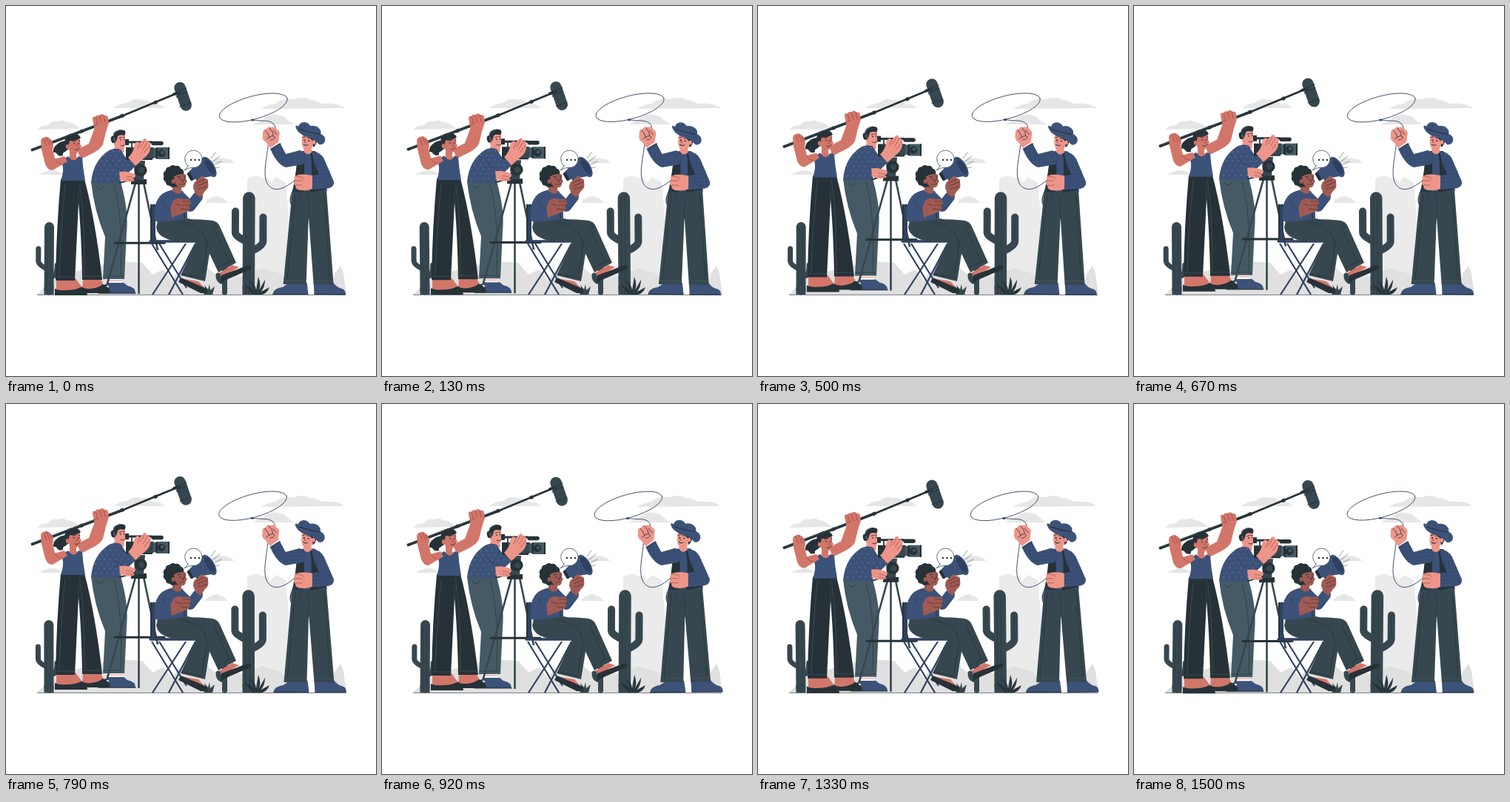
An HTML page with a canvas for the animation above (1.54 s loop, 500 px wide and 500 px high).

```html
<!DOCTYPE html>
<html lang="en">
<head>
<meta charset="utf-8">
<title>Desert film set</title>
<style>
html, body { margin: 0; width: 100%; height: 100%; overflow: hidden; background: #fff; }
canvas { display: block; width: 100vw; height: 100vh; }
</style>
</head>
<body>
<canvas id="stage"></canvas>
<script>
const canvas = document.getElementById('stage');
const ctx = canvas.getContext('2d');
const ratio = Math.max(1, window.devicePixelRatio || 1);
canvas.width = canvas.height = 500 * ratio;

const LOOP = 1540, TAU = Math.PI * 2;
const INK = '#263238', SLATE = '#37474f', STEEL = '#455a64', BLUE = '#3c5279', NAVY = '#2f4160';
const TAN = '#d3766a', TAN_LINE = '#9c4a44', PINK = '#ee958a', PINK_LINE = '#a8524c';
const BROWN = '#9f5b53', BROWN_LINE = '#5f302c', CLOUD = '#e6e6e6', HILL = '#ebebeb', DUNE = '#e0e0e0';

const cache = {};
const shape = d => cache[d] || (cache[d] = new Path2D(d));

function fill(color, d) {
  ctx.fillStyle = color;
  ctx.fill(shape(d));
}
function line(color, width, d, cap = 'round') {
  ctx.strokeStyle = color;
  ctx.lineWidth = width;
  ctx.lineCap = cap;
  ctx.lineJoin = 'round';
  ctx.stroke(shape(d));
}
function oval(color, x, y, rx, ry = rx, turn = 0) {
  ctx.fillStyle = color;
  ctx.beginPath();
  ctx.ellipse(x, y, rx, ry, turn, 0, TAU);
  ctx.fill();
}
function group(draw, change) {
  ctx.save();
  if (change) change();
  draw();
  ctx.restore();
}
// Small marks kept inside a garment.
function pattern(d, draw) {
  group(draw, () => ctx.clip(shape(d)));
}

function background() {
  fill(HILL, 'M323 390L326 233 338 229 348 233 354 232 357 239 365 231 378 238 392 390Z');
  fill(DUNE, 'M438 390L444 362 452 351 456 361 460 390Z');
  fill(DUNE, 'M42 390Q54 377 76 364L120 352 150 345 184 347 198 363 212 356 224 370 240 350 262 346 282 362 300 358 322 366 346 354 372 362 390 390Z');
  fill(CLOUD, 'M42 167Q47 161 57 161Q62 154 71 156Q77 153 82 157Q91 157 100 166Z');
  fill(CLOUD, 'M145 138Q155 131 164 131Q172 124 182 127Q191 126 199 132Q210 132 215 138Z');
  fill(CLOUD, 'M344 139Q356 133 364 132Q372 124 390 126Q401 121 411 127Q419 127 426 132Q448 130 458 138Z');
  fill(CLOUD, 'M333 160Q345 155 351 151Q361 144 370 148Q377 148 380 154L390 160Z');
  fill(CLOUD, 'M45 228Q53 222 66 222L82 228Z');
  fill(CLOUD, 'M269 266Q275 258 284 257Q293 258 300 266Z');
  fill(CLOUD, 'M272 213Q279 205 288 206Q299 204 309 212Z');
}

function sway(bend, draw) {
  group(draw, () => ctx.transform(1, 0, -bend, 1, 390 * bend, 0));
}
function cacti(bend) {
  sway(bend * 1.2, () => {
    line(SLATE, 7, 'M43.5 328V345Q44 350 55 355');
    line(SLATE, 13, 'M58 298.5V384');
    fill(SLATE, 'M51.5 380H64.5V390H51.5Z');
    line(INK, .5, 'M55 300V386M60 298V386');
    line(SLATE, 7, 'M64 365Q69 363 69 350');
  });
  line(SLATE, 7, 'M295.5 352V387M287 364Q287 372 295 373');
  sway(bend, () => {
    line(SLATE, 10, 'M309.5 277.5V306Q310 312 325 318');
    line(SLATE, 10, 'M347 285.5V318Q347 324 332 331');
    line(SLATE, 16.5, 'M327.8 259.5V382');
    fill(SLATE, 'M319.5 378H336V390H319.5Z');
    line(INK, .5, 'M324 258V388M329 256V388M309 278V305M347 286V316');
  });
}
function grass() {
  fill(INK, 'M334 390L321 376Q331 379 335 385L329 370Q337 376 338 384L341 366Q345 376 342 384L350 370Q350 379 345 386L356 380Q353 388 346 390Z');
  line(STEEL, .6, 'M337 390L331 374M340 389L341 370M343 389L349 374');
  fill(SLATE, 'M268 390L262 381 270 385 268 377 273 383 275 376 276 384 282 379 279 390Z');
}

function lasso() {
  ctx.strokeStyle = NAVY;
  ctx.lineWidth = .9;
  ctx.beginPath();
  ctx.ellipse(334, 137.5, 47.5, 15.5, -.27, 0, TAU);
  ctx.stroke();
  line(NAVY, .9, 'M333 154C344 156 352 154 358 157Q366 161 363 168');
  line(NAVY, .9, 'M354 188C353 203 346 228 353 240C362 254 377 247 393 233');
  oval(NAVY, 333, 154.2, 2.2, 1.4);
}
function cowboy() {
  const raised = 'M357 193L370 185 378 200 397 195 408 202 401 214 378 218Q366 214 357 193Z';
  const folded = 'M413 196Q425 197 430 207L443 237Q444 244 436 246L414 248 413 229 423 227 416 211Z';
  lasso();
  fill(BLUE, 'M361 390Q361 382 374 380L383 374H407L409 390Z');
  fill(BLUE, 'M416 374H443Q447 380 455 382Q460 384 459 390H417Z');
  line(INK, 1, 'M361 389.5H408M417 389.5H459');
  fill(SLATE, 'M387 248H433L443 376H416L409 284 406 376H375Z');
  line(INK, .7, 'M410 259Q408 272 409 288M391 255L380 370M430 255L438 370');
  line(STEEL, .7, 'M377 371H405M417 371H442');
  fill(BLUE, 'M394 196L418 196 428 214 434 250 389 250 393 214Z');
  fill(INK, 'M394 197L402 196Q404 221 402 251H387Q393 222 394 197Z');
  fill(INK, 'M411 196H417Q429 217 433 248L411 252Q415 221 411 196Z');
  fill(BLUE, raised);
  fill(BLUE, folded);
  for (const sleeve of [raised, folded]) pattern(sleeve, () => {
    ctx.globalAlpha = .55;
    ctx.strokeStyle = NAVY;
    ctx.lineWidth = .7;
    ctx.beginPath();
    for (let i = 0; i < 30; i++) {
      ctx.moveTo(340 + i * 5, 180); ctx.lineTo(350 + i * 5, 250);
      ctx.moveTo(350, 180 + i * 5); ctx.lineTo(445, 170 + i * 5);
    }
    ctx.stroke();
  });
  line(NAVY, .8, 'M358 194L371 186M414 211L423 227M414 230V247');
  fill(PINK, 'M357 192L351 184Q345 181 347 173Q346 167 351 167Q354 162 358 164Q364 162 366 167Q371 169 369 176L368 184Z');
  line(INK, .8, 'M350 168Q355 173 356 178M356 165Q361 170 361 175M361 168L366 174M352 180Q360 173 363 177Q363 181 357 181');
  fill(PINK, 'M402 186H413V198Q406 203 402 196Z');
  fill(PINK, 'M401 171Q398 184 401 191Q405 195 411 193Q418 188 418 175Z');
  fill(INK, 'M401 171L421 177Q420 187 415 191L414 182Q411 180 410 177Q404 177 401 174Z');
  oval(PINK, 416, 184, 2.2, 3);
  line(INK, 1, 'M401 177.5L404 177M407 178L411 178.5M402 187Q405 189 408 187.5');
  oval(INK, 403, 181, .9, 1.2);
  oval(INK, 409, 182, .9, 1.2);
  line(PINK_LINE, .8, 'M405 181L403 184.5H405.5');
  fill(BLUE, 'M394 168Q394 158 402 157Q408 157 411 162Q420 160 425 168Q426 174 423 179Z');
  fill(BLUE, 'M391 163Q392 159 398 166Q408 170 421 171Q432 174 431 182Q429 188 423 187Q416 179 405 176Q393 172 391 163Z');
  line(INK, 1.2, 'M396 166Q409 171 423 173');
  line(NAVY, 1, 'M397 243C385 244 379 270 389 270C399 270 396 253 397 243M401 244C392 265 397 272 404 267C411 262 407 250 401 244M395 244Q382 258 386 266');
  fill(PINK, 'M414 229V247Q407 250 400 249Q391 249 391 243Q388 241 390 236Q388 232 392 229Q401 226 414 229Z');
  line(PINK_LINE, .8, 'M390 236H400M391 242H400M392 230Q400 230 403 234');
}

function manBody() {
  const shirt = 'M115 239Q117 213 134 199Q144 190 155 194L163 207 179 203 174 217Q164 229 156 228L155 240Z';
  fill(NAVY, 'M125 388Q125 378 135 376L145 388Z');
  fill(BLUE, 'M137 374H159L164 378Q175 380 175 388H133Z');
  line(INK, 1.2, 'M125 388H175');
  fill('#fff', 'M138 368H157V374H138Z');
  line(PINK, 1.2, 'M138 371H157', 'butt');
  fill(STEEL, 'M115 238H155Q166 276 163 306L160 369H131L134 312Q119 276 115 238Z');
  line(INK, .6, 'M146 243Q158 281 155 363M132 365H159M122 244Q127 251 133 243');
  fill(PINK, 'M149 186L159 190 160 197 153 201 145 194Z');
  fill(BLUE, shirt);
  pattern(shirt, () => {
    for (let row = 0; row < 8; row++)
      for (let col = 0; col < 10; col++)
        oval('#a9b9d2', 113 + col * 8 + row % 2 * 4, 196 + row * 6.3, .5);
  });
  line(NAVY, .8, 'M139 208Q150 224 166 224M163 207L156 202');
  fill(PINK, 'M146 173Q154 169 161 174L161 182 163 186 161 188Q161 195 153 193L146 188Z');
  fill(INK, 'M145 181Q143 171 149 169Q153 166 160 168Q163 171 160 175Q153 173 151 176L149 183Z');
  line(STEEL, 1.2, 'M145 178Q145 170 153 168');
  oval(INK, 145, 180.5, 3.2, 4.8, -.2);
  oval(STEEL, 146.5, 180.5, 1.4, 3.2, -.2);
  line(INK, .9, 'M153 178.5L156 177.5M158 177.5H160M155 188.5Q157 190 160 188');
  oval(INK, 155, 181, .8, 1);
  oval(INK, 159.5, 180.5, .7, 1);
}

function tripod() {
  line(SLATE, 2.6, 'M179.5 239V389M175 239L135 382M186 239L205 330', 'butt');
  line(INK, 3, 'M147 320.3H214');
  oval(INK, 136, 380.5, 3);
  oval('#fff', 137, 379.5, 1.9);
  fill(INK, 'M169 234H190V241H169Z');
  fill(SLATE, 'M173 209H188L186 235H174Z');
  oval(INK, 182, 222, 8.5, 8);
  oval(SLATE, 183, 222, 4.2);
  line(INK, 2, 'M174 233L154 239');
}
function camera() {
  fill(INK, 'M162 191H198V208H162Z');
  fill(SLATE, 'M182 191H200V206H182Z');
  fill(STEEL, 'M199 193L204 191H221V207H204L199 204Z');
  fill(INK, 'M202 192H205V206H202ZM219 191H221V207H219Z');
  oval(INK, 210, 199, 5.2);
  oval(STEEL, 211, 198, 2.2);
  line(INK, 3, 'M164 184H197');
  line(INK, 5.5, 'M199 185.5H210');
  line(SLATE, 2, 'M170 185V192M192 186V192');
  fill(INK, 'M161 180H166V188H161Z');
}
function manHands() {
  fill(PINK, 'M175 216L165 205Q172 198 173 190Q175 180 181 185L187 179Q191 179 190 183Q196 182 195 189Q196 199 186 206Z');
  line(PINK_LINE, .8, 'M181 186L178 193M187 182L182 191M191 184L185 194M195 188L187 198');
  fill(PINK, 'M153 224Q163 222 174 227Q177 231 171 232L174 236Q166 240 154 235Z');
  line(PINK_LINE, .7, 'M163 230L173 232M163 234L172 236');
}

function boom() {
  line(INK, 3.8, 'M34 195L157 148.5', 'butt');
  line(INK, 2.7, 'M156 149L232 117.5');
  line(INK, 4.6, 'M100 170L104 168.5M155 149.2L159 147.6M200 131L204 129.4', 'butt');
  line(STEEL, .6, 'M38 192.8L150 150');
  line(SLATE, 15.5, 'M235 110.5L243.2 134');
  line(INK, 1, 'M229 117L244 111M235 136L250 131M231 121L245 116');
  line(INK, 4, 'M227 119L234 117');
  line(NAVY, 1.8, 'M231 123L234 114');
}
function boomOperator() {
  fill(INK, 'M84 182Q74 182 69 187Q63 191 64 198Q67 197 69 200Q71 204 77 202Q76 198 80 197L88 190Z');
  fill(TAN, 'M96 194L112 186 120 164 136 166 131 187Q128 193 119 198L101 207Z');
  fill(TAN, 'M68 368H94L102 379 101 386H68ZM104 368L127 367 132 377 129 385H103Z');
  fill(INK, 'M66 391V382Q72 385 82 384Q94 384 101 380Q110 385 110 391Z');
  fill(INK, 'M102 388V379Q107 383 115 382Q125 381 131 376Q140 380 141 386L138 388Z');
  fill(INK, 'M74 234H106Q121 290 130 370H103Q102 310 98 266L93 371H67Q68 300 74 234Z');
  line(STEEL, .6, 'M99 240Q106 278 106 365M80 241Q74 300 72 365M98 251V270M68 366H92M104 365H129');
  fill(TAN, 'M86 195H95V204L102 207 98 215H82L75 208 86 204Z');
  fill(BLUE, 'M79 206L84 203Q92 214 98 203L103 205Q104 220 107 236H74Q79 222 76 213Z');
  line(TAN, 14.5, 'M55 192L60 212');
  fill(TAN, 'M53 212Q55 222 63 222L83 210 79 203 65 207Z');
  fill(TAN, 'M81 178Q96 171 100 179L100 186 102 190 100 192Q99 200 91 199Q82 197 81 178Z');
  fill(INK, 'M80 189Q77 175 88 172.5Q98 171 101 178Q94 183 86 182L84 191Z');
  oval(TAN, 83, 190, 2.2, 3);
  line(INK, .9, 'M90 183L94 182M98 182L100 183M93 194Q97 196 99 192');
  oval(INK, 92, 186, .8, 1);
  oval(INK, 98, 186, .8, 1);
  line(TAN_LINE, .8, 'M95 186L97 190H95M66 207Q70 214 75 213');
  boom();
  fill(TAN, 'M48 194L47 184Q47 178 51 178Q55 175 59 179Q64 182 64 191L61 196Z');
  line(TAN_LINE, .8, 'M51 179L55 189M55 178L59 188M59 180L62 187');
  fill(TAN, 'M120 168L117 153Q117 148 121 150Q122 146 126 148Q130 144 133 148Q138 147 138 152L139 158 135 170Z');
  line(TAN_LINE, .8, 'M121 150L124 160M126 148L129 158M132 148L134 157M118 162L125 159');
}

function chair() {
  fill(NAVY, 'M195 268H202V317H195Z');
  line(INK, 1.6, 'M196 268V318', 'butt');
  line(NAVY, 2.2, 'M198 390L243 321M220 390L256 321M197 321L239 390M207 321L244 381', 'butt');
  line(NAVY, 3.4, 'M195 318H257');
}
function megaphone() {
  line(INK, 3, 'M258 232L262 245');
  fill(BLUE, 'M246 225L266 205 283 229 252 235Z');
  oval(BLUE, 274.5, 217.5, 7, 15.5, -.55);
  oval(NAVY, 275.5, 217, 4.6, 12, -.55);
  line(INK, 4.5, 'M247 227L251 234');
  line(INK, .5, 'M277 206L283 198M280 210L289 203M282 214L291 210M283 219L288 218');
}
function bubble() {
  const outline = 'M246 216A11.7 11.7 0 1 1 252 218.5Q247 218 241 222Q245 219 246 216Z';
  fill('#fff', outline);
  line(INK, .7, outline);
  for (const x of [250, 255.5, 261]) oval(INK, x, 208, 1.25);
}
function director() {
  chair();
  fill(TAN, 'M289 360L306 350 315 353 292 366ZM236 368L260 372 268 381Z');
  fill(INK, 'M290 374L291 364 328 350Q334 351 330 356L302 368Z');
  fill(INK, 'M233 373L236 367 267 380Q274 383 272 388L263 388Z');
  fill(SLATE, 'M205 290L246 287 266 293 277 322 269 372 236 364 257 318H230Q205 314 203 299Z');
  fill(SLATE, 'M236 288Q266 288 279 290Q286 291 289 298L311 347 287 360 270 324 262 318 230 315Z');
  line(INK, .8, 'M234 291Q267 296 272 321L265 363M239 362L267 368M285 354L308 343M280 298L301 344');
  line(BLUE, 14, 'M236 258L249 271 259 258');
  fill(BLUE, 'M201 291Q198 265 211 254Q225 245 239 250L245 266 245 287Q222 292 201 291Z');
  fill(BROWN, 'M225 241H237V252Q231 256 225 250Z');
  for (let i = 0; i < 11; i++) {
    const a = i / 11 * TAU;
    oval(INK, 227 + 9.5 * Math.cos(a), 230 + 10 * Math.sin(a), 5.2);
  }
  oval(INK, 227, 230, 11);
  fill(BROWN, 'M227 230Q238 225 243 228L243 234 245 237 243 239Q243 247 235 245Q227 243 227 230Z');
  oval(BROWN, 226, 237, 2.4, 3);
  line(INK, .9, 'M232 231L236 230M240 230L243 231');
  oval(INK, 235, 234, .8, 1);
  oval(INK, 241, 234, .8, 1);
  line(BROWN_LINE, .9, 'M235 241Q239 242 241 240M238 234L240 237H238');
  megaphone();
  fill(BROWN, 'M256 254L253 246Q253 237 258 236L264 230Q268 229 268 233Q274 232 273 239Q275 246 269 250L263 259Z');
  line(BROWN_LINE, .8, 'M259 239L268 234M259 243L272 238M260 247L271 244');
  line(BLUE, 15, 'M210 269Q208 283 222 281');
  line(NAVY, .8, 'M212 263Q213 273 222 274M252 275L263 263');
  fill(BROWN, 'M224 286L222 272 226 263Q231 258 239 261L248 261Q251 266 248 271Q249 277 240 280Z');
  line(BROWN_LINE, .8, 'M239 264H248M238 269H249M236 274L246 275M229 267L236 270');
  line(INK, 1.2, 'M241 280L241 288');
  bubble();
}

function render(time) {
  const t = time % LOOP;
  const wave = (period, shift) => Math.cos(TAU * (t - shift) / period);
  const lift = -2.7 * (1 - wave(LOOP, 1460)) + .2;
  const tilt = .8 * Math.PI / 180 * wave(LOOP, 335);
  const bend = wave(LOOP / 5, 259) * .0085;

  ctx.setTransform(ratio, 0, 0, ratio, 0, 0);
  ctx.fillStyle = '#fff';
  ctx.fillRect(0, 0, 500, 500);
  background();
  line(SLATE, .7, 'M42 390.4H459', 'butt');
  cacti(bend);
  grass();
  group(() => {
    manBody();
    tripod();
    camera();
    manHands();
    boomOperator();
  }, () => ctx.translate(0, lift));
  director();
  group(cowboy, () => {
    ctx.translate(374, 254);
    ctx.rotate(tilt);
    ctx.translate(-374, -254);
  });
}

function tick() {
  render(performance.now());
  requestAnimationFrame(tick);
}
tick();
</script>
</body>
</html>
```
